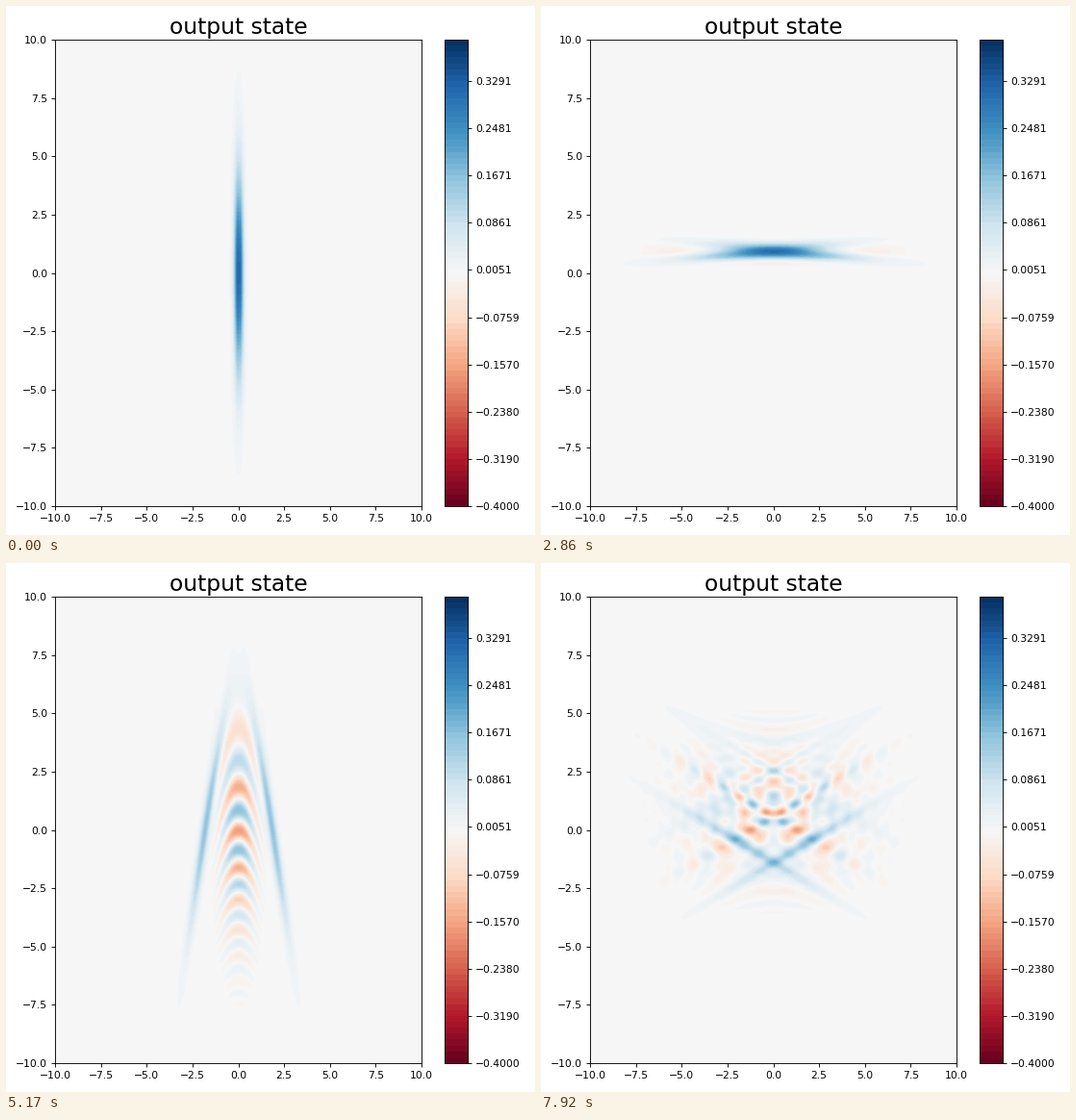
These frames come from a looping animation (550 by 550 pixels, 8000 ms). A matplotlib script:

```python
import numpy as np
import matplotlib.pyplot as plt
from matplotlib.animation import FuncAnimation

SIZE, DPI = 550, 80
INTERVAL, FRAMES = 40, 200      # one loop: 8000 ms
STEP_MS = 110
ROUND = 50                      # steps for a half turn
PAUSE_END = 54                  # second round starts after this step
G = 0.9                         # drive strength / rotation rate
SQUEEZE = 1.45
N_FOCK = 160

# position grid: the middle 381 points are shown, the rest is padding
HALF, REACH = 190, 180
H = 10 / HALF
x = np.arange(-HALF - REACH, HALF + REACH + 1) * H
p = np.linspace(-10, 10, 485)

shift = np.arange(-REACH, REACH + 1)
center = np.arange(REACH, REACH + 2 * HALF + 1)[:, None]
kernel = np.exp(2j * np.outer(shift * H, p))

levels = np.linspace(-0.4, 0.4, 80)
BANDS = len(levels) - 1


def oscillator_basis(q, count):
    rows = [np.pi ** -0.25 * np.exp(-q ** 2 / 2)]
    rows.append(np.sqrt(2) * q * rows[0])
    for n in range(2, count):
        rows.append(np.sqrt(2 / n) * q * rows[-1] - np.sqrt((n - 1) / n) * rows[-2])
    return np.array(rows)


basis = oscillator_basis(x - G, N_FOCK)
number = np.arange(N_FOCK)


def normalize(psi):
    return psi / np.sqrt(np.sum(np.abs(psi) ** 2) * H)


def evolve(psi, theta):
    """Superpose the driven clockwise branch and its mirror image."""
    coef = basis @ psi * H
    phase = np.exp(1j * theta * (G ** 2 / 2 - number))
    branch = (phase * coef) @ basis
    return normalize(branch + branch[::-1].conj())


def wigner(psi):
    corr = psi[center + shift].conj() * psi[center - shift]
    return (corr @ kernel).real.T * H / np.pi


def to_bands(w):
    band = np.floor((w + 0.4) / 0.8 * BANDS)
    return np.clip(band, 0, BANDS - 1).astype(np.uint8)


squeezed = normalize(np.exp(-(x * np.exp(SQUEEZE)) ** 2 / 2))
cat = evolve(squeezed, np.pi)
cache = {}


def picture(step):
    if ROUND < step <= PAUSE_END:
        step = ROUND
    if step not in cache:
        if step <= ROUND:
            psi = evolve(squeezed, np.pi * step / ROUND)
        else:
            psi = evolve(cat, np.pi * (step - PAUSE_END) / ROUND)
        cache[step] = to_bands(wigner(psi))
    return cache[step]


def place(left, right, top, bottom):
    return [left / SIZE, 1 - bottom / SIZE, (right - left) / SIZE, (bottom - top) / SIZE]


plt.rcParams.update({"font.family": "DejaVu Sans", "font.size": 9.7})
fig = plt.figure(figsize=(SIZE / DPI, SIZE / DPI), dpi=DPI, facecolor="white")
style = dict(cmap="RdBu", vmin=-0.5, vmax=BANDS - 0.5, origin="lower",
             aspect="auto", interpolation="nearest")

ax = fig.add_axes(place(51, 432, 35, 520))
image = ax.imshow(picture(0), extent=(-10, 10, -10, 10), **style)
ticks = np.arange(-10, 10.1, 2.5)
ax.set_xticks(ticks)
ax.set_yticks(ticks)
ax.set_title("output state", fontsize=21, pad=5.4)

bar = fig.add_axes(place(456, 480.25, 35, 520))
bar.imshow(np.arange(BANDS)[:, None], extent=(0, 1, -0.4, 0.4), **style)
bar.set_xticks([])
bar.yaxis.tick_right()
bar.set_yticks(levels[::8], [f"{v:.4f}".replace("-", "\u2212") for v in levels[::8]])


def update(i):
    step = (i * INTERVAL + INTERVAL - 1) // STEP_MS
    image.set_data(picture(step))
    return [image]


anim = FuncAnimation(fig, update, frames=FRAMES, interval=INTERVAL,
                     repeat=True, repeat_delay=0, blit=False)
plt.show()
```
